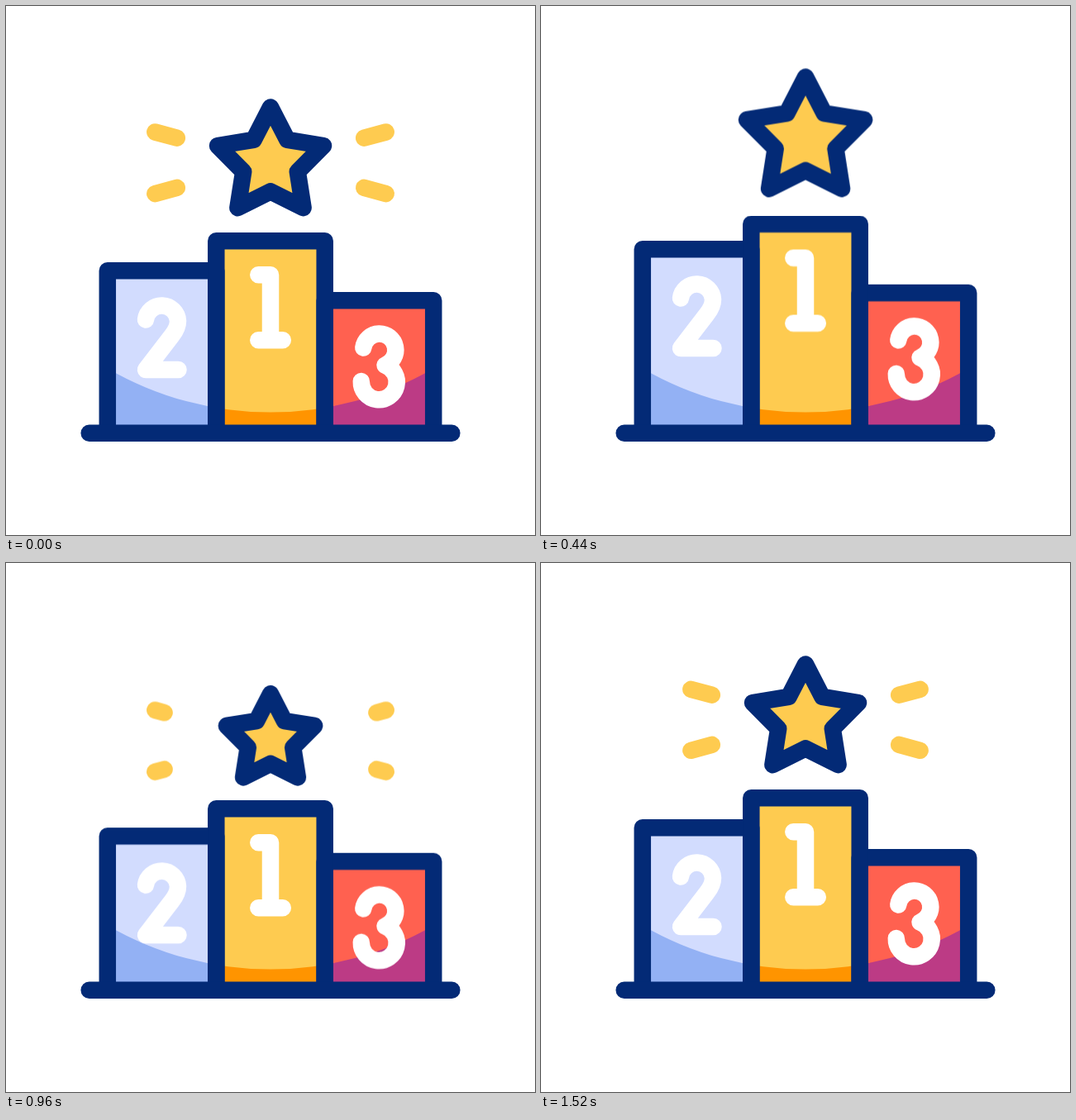
An HTML page for the animation above (1560 ms loop, 640x640 px).

```html
<!DOCTYPE html>
<html lang="en">
<head>
<meta charset="utf-8">
<title>Podium</title>
<style>
  html, body { margin: 0; width: 100%; height: 100%; overflow: hidden; background: #fff; }
  svg { display: block; width: 100vw; height: 100vh; }

  .line { fill: none; stroke: #032a76; stroke-width: 20.5; stroke-linecap: round; stroke-linejoin: round; }
  .digit { stroke: #fff; }

  .bob, .star, .rays path {
    animation: bob 1560ms cubic-bezier(.333, 0, .667, 1) infinite;
  }
  .bob { --up: -26px; --down: 13px; }
  .first { animation-delay: -1440ms; }
  .third { animation-delay: -1320ms; }
  .top { --up: -38px; --down: 25.5px; }

  .star {
    fill: #fecb50;
    vector-effect: non-scaling-stroke;
    transform-origin: 320px 183px;
    animation-name: pulse;
    animation-delay: -1440ms;
  }

  .rays path {
    stroke: #fecb50;
    stroke-dasharray: 1 9;
    animation-name: sweep;
  }
  .rays { animation: blink 1560ms step-end infinite; }

  @keyframes bob {
    0%, 2.564% { transform: translateY(0); }
    28.205% { transform: translateY(var(--up)); }
    53.846% { transform: translateY(var(--down)); }
    79.487%, 100% { transform: translateY(0); }
  }
  @keyframes pulse {
    0%, 2.564% { transform: scale(1); }
    28.205% { transform: scale(1.14); }
    53.846% { transform: scale(.83); }
    79.487%, 100% { transform: scale(1); }
  }
  /* grow from the inner end, then shrink towards the outer end */
  @keyframes sweep {
    0% { stroke-dashoffset: 0; }
    14.1% { stroke-dashoffset: -1; }
    33.333% { stroke-dashoffset: 1; }
    53.846% { stroke-dashoffset: 0; }
    67.95% { stroke-dashoffset: -1; }
    79.487% { stroke-dashoffset: 1; }
    100% { stroke-dashoffset: 0; }
  }
  @keyframes blink {
    0% { opacity: 1; }
    14.1% { opacity: 0; }
    33.4% { opacity: 1; }
    67.95% { opacity: 0; }
    79.55%, 100% { opacity: 1; }
  }
</style>
</head>
<body>
<svg viewBox="0 0 640 640">
  <defs>
    <path id="box1" d="M254.3 570V284.3H385.7V570"/>
    <path id="box2" d="M122.8 570V320.2H254.3V570"/>
    <path id="box3" d="M385.7 570V356.2H517.2V570"/>
    <clipPath id="ground"><path d="M0 0H640V517H0Z"/></clipPath>
    <linearGradient id="shade">
      <stop offset=".3333" stop-color="#93b1f4"/>
      <stop offset=".3333" stop-color="#ff9400"/>
      <stop offset=".6667" stop-color="#ff9400"/>
      <stop offset=".6667" stop-color="#bc3b85"/>
    </linearGradient>
  </defs>

  <g clip-path="url(#ground)">
    <use class="bob" href="#box2" fill="#d2dcfe"/>
    <use class="bob third" href="#box3" fill="#ff6150"/>
    <use class="bob first" href="#box1" fill="#fecb50"/>
    <path fill="url(#shade)" d="M122.8 438.4A392 392 0 0 0 517.2 438.4V517H122.8Z"/>
    <g class="line">
      <g class="bob">
        <use href="#box2"/>
        <path class="digit" d="M169 379.5A19.6 19.6 0 0 1 208 381C208 388 205 393.500 200.500 399L169 440H208.500"/>
      </g>
      <g class="bob third">
        <use href="#box3"/>
        <path class="digit" d="M432.300 413.500A19.600 19.600 0 1 1 458.500 434.500A21.500 21.500 0 1 1 429.800 454"/>
      </g>
      <g class="bob first">
        <use href="#box1"/>
        <path class="digit" d="M305.300 325.300H320V404.200M305.300 404.200H334.800"/>
      </g>
    </g>
  </g>
  <path class="line" d="M100.700 516.800H539.300"/>

  <g class="bob first top">
    <path class="line star" d="M320 122.500L340.300 161.900L384 169L352.800 200.500L359.600 244.200L320 224.300L280.400 244.200L287.200 200.500L256 169L299.700 161.900Z"/>
    <g class="line rays">
      <path pathLength="1" d="M206.800 159.700L180.300 152.500"/>
      <path pathLength="1" d="M206.800 219.900L180.300 227.100"/>
      <path pathLength="1" d="M433.200 159.700L459.700 152.500"/>
      <path pathLength="1" d="M433.200 219.900L459.700 227.100"/>
    </g>
  </g>
</svg>
</body>
</html>
```
